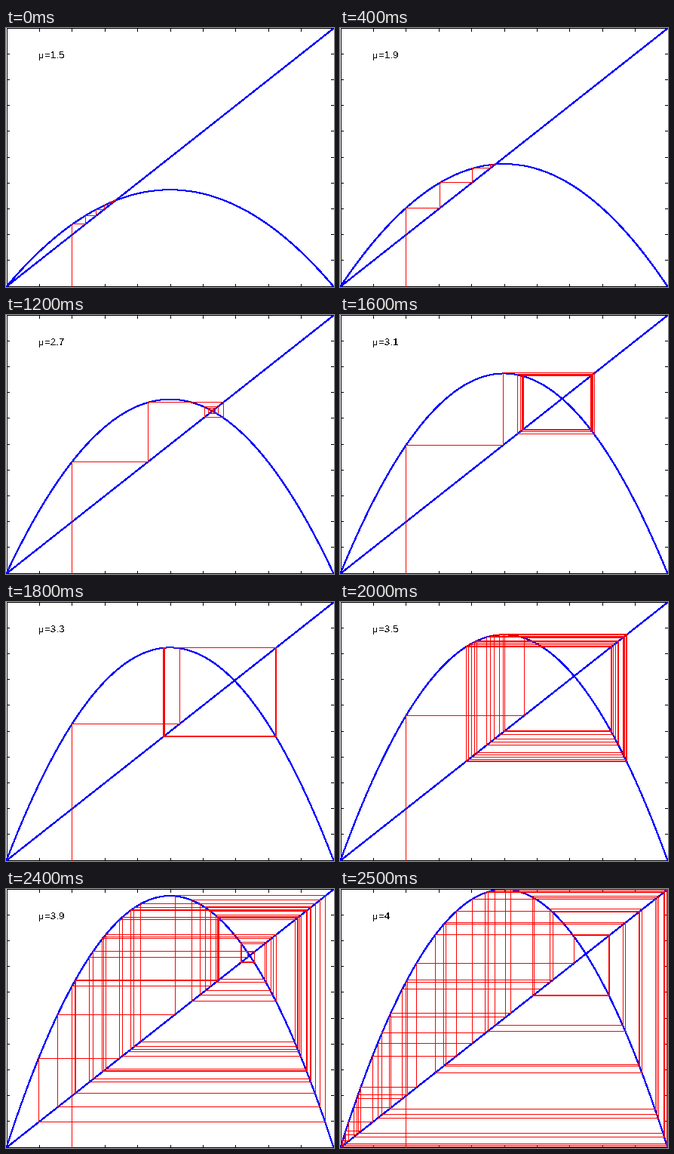
A matplotlib script for the animation above (2.6 s loop, 435x343 px).

```python
import numpy as np
import matplotlib.pyplot as plt
from matplotlib.animation import FuncAnimation

W, H, DPI = 435, 343, 100
FRAMES, INTERVAL = 26, 100
START, STEPS = 0.2, 50
PX = 72 / DPI  # one pixel in points

plt.rcParams["path.simplify"] = False
plt.rcParams["text.antialiased"] = False


def to_pixels(x, y):
    """Map unit coordinates to pixel centres."""
    x, y = np.asarray(x), np.asarray(y)
    return np.floor(x * (W - 1)) + 0.5, np.floor((1 - y) * (H - 1)) + 0.5


def logistic(mu, x):
    return mu * x * (1 - x)


def cobweb(mu):
    x, xs, ys = START, [START], [0.0]
    for _ in range(STEPS):
        nxt = logistic(mu, x)
        xs += [x, nxt]
        ys += [nxt, nxt]
        x = nxt
    return xs, ys


# The small surplus keeps size times dpi from rounding down a pixel.
fig = plt.figure(figsize=((W + 0.01) / DPI, (H + 0.01) / DPI), dpi=DPI,
                 facecolor="white")
ax = fig.add_axes([0, 0, 1, 1])
ax.set(xlim=(0, W), ylim=(H, 0))
ax.axis("off")


def line(x, y, color):
    return ax.plot(x, y, color=color, lw=PX, antialiased=False,
                   solid_capstyle="projecting", solid_joinstyle="miter")[0]


def draw_frame_box():
    line(*to_pixels([0, 1, 1, 0, 0], [0, 0, 1, 1, 0]), "black")
    right, bottom, size = W - 0.5, H - 0.5, 4
    for k in range(1, 10):
        x, y = to_pixels(k / 10, k / 10)
        for edge, inner in ((0.5, size), (bottom, bottom - size + 0.5)):
            line([x, x], [edge, inner], "black")
        for edge, inner in ((0.5, size), (right, right - size + 0.5)):
            line([edge, inner], [y, y], "black")


draw_frame_box()
grid = np.linspace(0, 1, 101)
line([0.5, W - 0.5], [H - 0.5, 0.5], "blue")
curve = line([], [], "blue")
web = line([], [], "red")

FONT = 13.33 * PX
ax.text(43, 40, "μ", family="Liberation Serif", size=FONT)
label = ax.text(51, 40, "", family="Liberation Sans", size=FONT)


def update(i):
    mu = (15 + i) / 10
    curve.set_data(grid * (W - 1) + 0.5,
                   (1 - logistic(mu, grid)) * (H - 1) + 0.5)
    web.set_data(*to_pixels(*cobweb(mu)))
    label.set_text(f"={mu:g}")
    return curve, web, label


anim = FuncAnimation(fig, update, frames=FRAMES, interval=INTERVAL,
                     repeat=True, repeat_delay=0)
plt.show()
```
